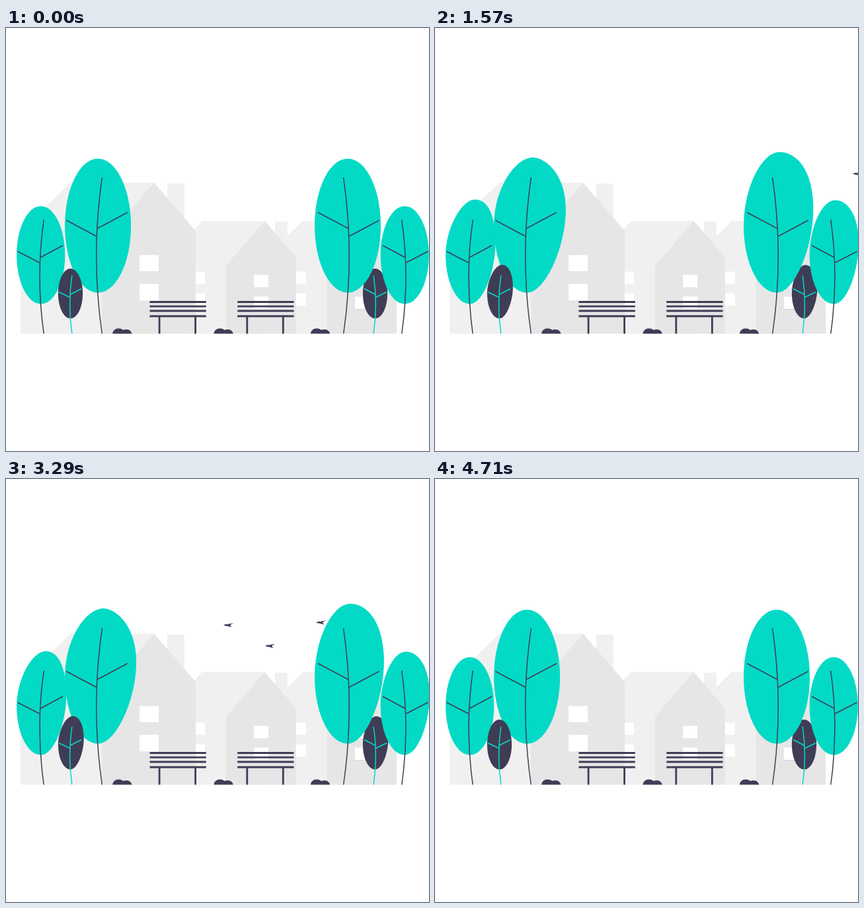
These frames come from a looping animation (640x640 px, 4780 ms). An HTML page:

```html
<!DOCTYPE html>
<html lang="en">
<head>
<meta charset="utf-8">
<title>Park street</title>
<style>
html, body { margin: 0; width: 100%; height: 100%; overflow: hidden; background: #fff; }
svg { display: block; width: 100%; height: 100%; }
.side { fill: #f0f0f0; }
.front { fill: #e6e6e6; }
.pane { fill: #fff; }
.dark { fill: #3f3d56; }
.teal { fill: #03dac6; }
.vein { fill: none; stroke: #3f3d56; stroke-width: 1.5; }
.vein.light { stroke: #03dac6; }
</style>
</head>
<body>
<svg id="stage" viewBox="0 0 640 640" xmlns="http://www.w3.org/2000/svg">
  <defs>
    <g id="bench" class="dark">
      <path d="M217.5 413h85.3v2.9h-85.3zM217.5 419.7h85.3v2.9h-85.3zM217.5 426.5h85.3v2.9h-85.3zM217.5 434.6h85.3v2.9h-85.3z"/>
      <path d="M230.7 437h2.8v25.5h-2.8zM285.2 437h2.8v25.5h-2.8z"/>
    </g>
    <path id="bush" class="dark" d="M161.2 462.5C161.6 457.5 165.5 454.4 170.4 454.4C173.4 454.4 175.8 455.4 177.4 457C179 456.2 180.4 455.9 182 455.9C186.6 455.9 190 458.8 190.4 462.5Z"/>
  </defs>

  <path class="side" d="M244 235.5h25.7v100h-25.7zM407 293h18.7v80h-18.7z"/>
  <path class="side" d="M22.3 462.5V306L98 234H224V462.5Z"/>
  <path class="side" d="M280 462.5V310L297 292H391.5V462.5Z"/>
  <path class="side" d="M414 462.5V327L449 292H544V462.5Z"/>
  <path class="pane" d="M280 368.5h21v18.6h-21zM280 401.5h21v18.6h-21zM432 368.5h21.8v18.6h-21.8zM432 401.5h21.8v18.6h-21.8z"/>
  <path class="front" d="M145.3 462.5V325L224 234L287 307V462.5Z"/>
  <path class="front" d="M333 462.5V359.5L391.5 292L438.8 347V462.5Z"/>
  <path class="front" d="M485.7 462.5V359.5L544 292L591 347V462.5Z"/>
  <path class="pane" d="M202 343.5h29v24.5h-29zM202 387h29v25.2h-29z"/>
  <path class="pane" d="M375.2 373.6h21.8v18.6h-21.8zM375.2 406.2h21.8v18.8h-21.8zM528 373.6h21.8v18.6h-21.8zM528 406.5h21.8v18.8h-21.8z"/>
  <path d="M528 425.6h21.8" stroke="#ccc" stroke-width=".8"/>

  <use href="#bench"/><use href="#bench" x="132.7"/>
  <use href="#bush"/><use href="#bush" x="153.3"/><use href="#bush" x="299.7"/>
  <g id="birds"></g>
  <g id="trees"></g>
</svg>
<script>
const LOOP = 4780, SWAY_PEAK = 2360, BIRDS_END = 4110;
const K = 0.5523;

const make = (tag, cls, parent) => {
  const el = document.createElementNS("http://www.w3.org/2000/svg", tag);
  el.setAttribute("class", cls);
  return parent.appendChild(el);
};
const byId = id => document.getElementById(id);

// Crown sizes and veins, drawn for the left side
const kinds = {
  big: { cy: 299.1, rx: 50, ry: 101.4, fill: "teal",
    vein: "M145.5 226C133.8 305 133.8 383 145.3 462.5M91.5 291L136.5 315M184 279L138.8 303" },
  small: { cy: 343.5, rx: 36.6, ry: 74, fill: "teal",
    vein: "M57.3 290C49 347 49 405 57.2 462.5M17.5 338L50.5 355M86 329L52.5 347" },
  shrub: { cy: 401.7, rx: 18.6, ry: 37.8, fill: "dark", light: true,
    vein: "M99.8 374.5C95.6 403 95.6 433 99.8 462.5M80 399.5L96.8 407.5M114 394.5L97.5 403" }
};

// top and right: how far those crown points lean; tilt bends the upper right side
const trees = [
  { kind: "big", cx: 139.1, top: [13, -2.8], right: [11.9, -33], tilt: [-7, 3, 8] },
  { kind: "small", cx: 52.7, top: [10.8, -13.6], right: [2.9, -24] },
  { kind: "shrub", cx: 97.5, top: [5, -7.7], right: [2.4, -12.5] },
  { kind: "shrub", cx: 558.5, flip: true, top: [2.5, -7.2], right: [1.8, -11] },
  { kind: "big", cx: 517, flip: true, top: [6, -13.5], right: [7.3, -34] },
  { kind: "small", cx: 603.3, flip: true, top: [2.7, -12.3], right: [1.6, -24] }
];
for (const tree of trees) {
  const kind = kinds[tree.kind];
  Object.assign(tree, kind);
  tree.crown = make("path", kind.fill, byId("trees"));
  const vein = make("path", kind.light ? "vein light" : "vein", byId("trees"));
  vein.setAttribute("d", kind.vein);
  if (tree.flip) vein.setAttribute("transform", "translate(656 0) scale(-1 1)");
}

function crownPath({ cx, cy, rx, ry, top, right, tilt = [0, 0, 0] }, p) {
  const hx = K * rx, hy = K * ry;
  const tx = cx + top[0] * p, ty = cy - ry + top[1] * p;
  const sx = cx + rx + right[0] * p, sy = cy + right[1] * p;
  const left = cx - rx, base = cy + ry;
  return `M${left} ${cy}C${left} ${cy - hy} ${tx - hx} ${ty} ${tx} ${ty}` +
    `C${tx + hx + tilt[0] * p} ${ty + tilt[1] * p} ${sx} ${sy - hy + tilt[2] * p} ${sx} ${sy}` +
    `C${sx} ${sy + hy} ${cx + hx} ${base} ${cx} ${base}` +
    `C${cx - hx} ${base} ${left} ${cy + hy} ${left} ${cy}Z`;
}

function sway(t) {
  const x = t < SWAY_PEAK ? t / SWAY_PEAK : (LOOP - t) / (LOOP - SWAY_PEAK);
  return x * x * (3 - 2 * x);
}

// Flight of the leading bird: time, x, y
const flight = [
  [0, 643, 195.5], [640, 582, 208.5], [1570, 492, 224.5], [2210, 431, 230.5],
  [3290, 329, 221], [4000, 274.5, 187], [4140, 264, 179.7]
];
const flock = [[0, 0], [63, 31.5], [140, -4]];
const birds = flock.map(() => make("path", "dark", byId("birds")));

function slope(i, axis) {
  const a = flight[Math.max(i - 1, 0)], b = flight[Math.min(i + 1, flight.length - 1)];
  return (b[axis] - a[axis]) / (b[0] - a[0]);
}

function flightAt(t, axis) {
  let i = 0;
  while (i < flight.length - 2 && t > flight[i + 1][0]) i++;
  const a = flight[i], b = flight[i + 1], span = b[0] - a[0];
  const u = (t - a[0]) / span, v = 1 - u;
  return v * v * (1 + 2 * u) * a[axis] + u * u * (3 - 2 * u) * b[axis] +
    span * u * v * (v * slope(i, axis) - u * slope(i + 1, axis));
}

function birdPath(t) {
  const lift = 0.5 * Math.cos((t - 2210) / 700 * 2 * Math.PI);
  const tip = -2.9 - lift;
  return `M0 .3Q4 -2.4 7.6 -.9Q8 -2.6 10 ${tip + 0.4}Q13 ${tip - 0.3} 15.5 ${tip + 0.3}` +
    `Q11.6 -1.6 10.2 .3Q11.2 1.2 12.2 3.2Q9.5 2.3 7.8 2Q4 1.7 0 .3Z`;
}

function draw(t) {
  const p = sway(t);
  for (const tree of trees) tree.crown.setAttribute("d", crownPath(tree, p));

  const shown = t < BIRDS_END;
  byId("birds").setAttribute("visibility", shown ? "visible" : "hidden");
  if (!shown) return;
  const x = flightAt(t, 1), y = flightAt(t, 2), shape = birdPath(t);
  birds.forEach((bird, i) => {
    bird.setAttribute("d", shape);
    bird.setAttribute("transform", `translate(${x + flock[i][0]} ${y + flock[i][1]})`);
  });
}

function tick() {
  draw(performance.now() % LOOP);
  requestAnimationFrame(tick);
}
tick();
</script>
</body>
</html>
```
